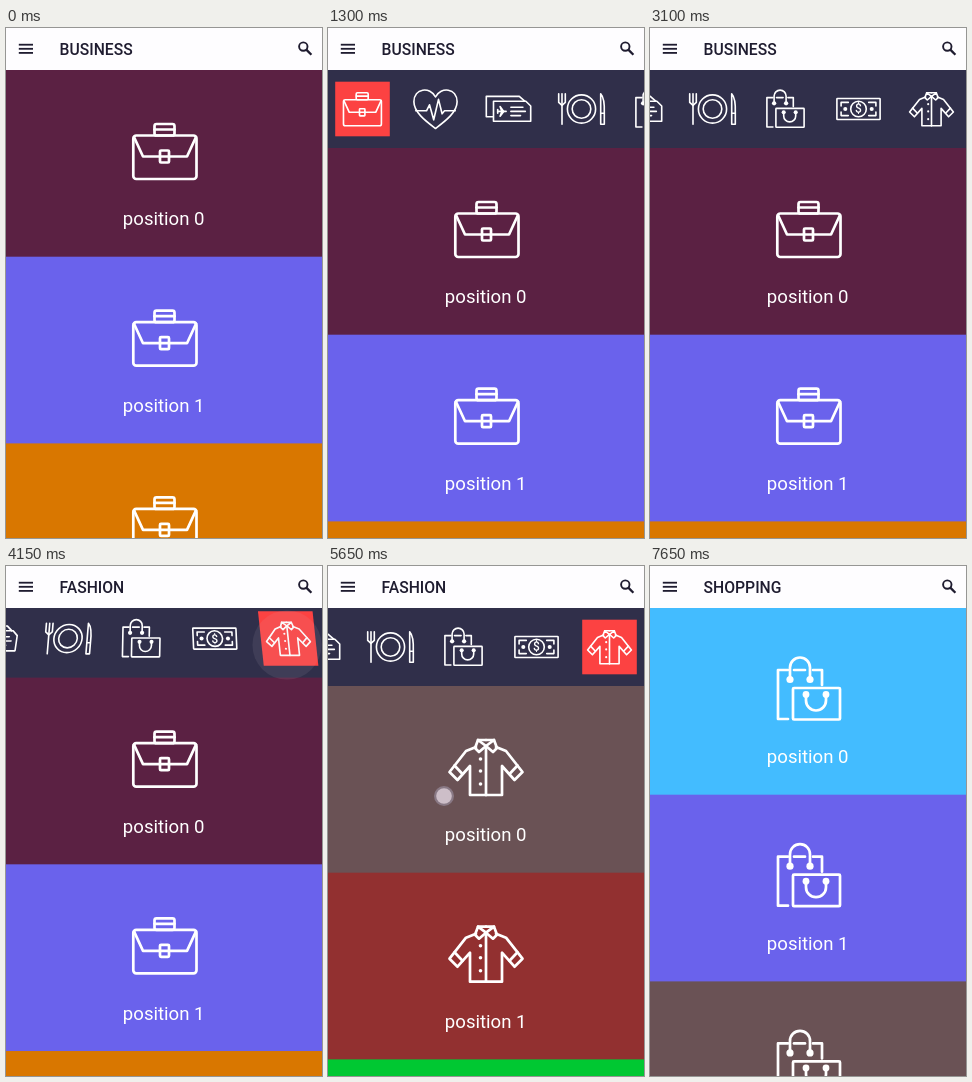
These frames come from a looping animation (316 px wide and 510 px high, 7700 ms). An HTML page with a canvas:

```html
<!DOCTYPE html>
<html lang="en">
<head>
<meta charset="utf-8">
<title>Pull-down menu</title>
<style>
html, body { margin: 0; width: 100%; height: 100%; overflow: hidden; background: #fefdff; }
canvas { display: block; width: 316px; height: 510px; }
</style>
</head>
<body>
<canvas id="stage"></canvas>
<script>
const W = 316, H = 510, LOOP = 7700;
const BAR = 42, MENU = 78, CARD = 186.7;
const FONT = 'Roboto, Arial, sans-serif';
const canvas = document.getElementById('stage');
const ctx = canvas.getContext('2d');
const dpr = window.devicePixelRatio || 1;
canvas.width = W * dpr;
canvas.height = H * dpr;

const clamp = v => Math.max(0, Math.min(1, v));
const span = (t, start, length) => clamp((t - start) / length);
const ease = v => (1 - Math.cos(Math.PI * v)) / 2;
const glide = (t, start, length) => ease(span(t, start, length));

// ---- drawing helpers ----
function trace(pts) {
  ctx.beginPath();
  for (let i = 0; i < pts.length; i += 2) ctx.lineTo(pts[i], pts[i + 1]);
}
function line(...pts) {
  trace(pts);
  ctx.stroke();
}
function shape(...pts) {
  trace(pts);
  ctx.closePath();
  ctx.stroke();
}
function box(x, y, w, h, r) {
  ctx.beginPath();
  ctx.roundRect(x, y, w, h, r);
  ctx.stroke();
}
function ring(x, y, r) {
  ctx.beginPath();
  ctx.arc(x, y, r, 0, Math.PI * 2);
  ctx.stroke();
}
function dot(x, y, r) {
  ctx.beginPath();
  ctx.arc(x, y, r, 0, Math.PI * 2);
  ctx.fill();
}
function mirrored(draw) {
  for (const side of [1, -1]) {
    ctx.save();
    ctx.scale(side, 1);
    draw();
    ctx.restore();
  }
}

// ---- icons, centred on 0,0 at card size ----
function briefcase() {
  box(-31.7, -15.5, 63.2, 43.5, 3);
  box(-10.5, -27, 20, 11.5, 2);
  line(-10.5, -21.5, 9.5, -21.5);
  line(-31, -14, -22, 5.5, -5, 5.5);
  line(31, -14, 22, 5.5, 4, 5.5);
  box(-5, -0.5, 9, 12, 1);
  line(-5, 5.5, 4, 5.5);
}
function heart() {
  ctx.beginPath();
  ctx.moveTo(0, 32.5);
  ctx.bezierCurveTo(-15, 21, -36, 6, -36, -12);
  ctx.bezierCurveTo(-36, -35, -9, -38, 0, -20);
  ctx.bezierCurveTo(9, -38, 36, -35, 36, -12);
  ctx.bezierCurveTo(36, 6, 15, 21, 0, 32.5);
  ctx.stroke();
  line(-33, 3, -15, 3, -10, -7, -3, 18, 5, -16, 11, 8, 15, 3, 33, 3);
}
function ticket() {
  line(-26, 13, -37, 13, -37, -21, 18, -21, 27, -13);
  shape(-25, -13, 29, -13, 37, -5, 37, 20.5, -25, 20.5);
  line(-18, 4, -4, 4);
  line(-18, 1, -18, 7);
  shape(-14, -4, -8, 4, -14, 12, -11, 4);
  line(4, -3, 24, -3);
  line(4, 4, 28, 4);
  line(4, 11, 20, 11);
}
function plate() {
  ring(0, 0, 23.5);
  ring(0, 0, 15.5);
  line(-38, -25.5, -38, -11, -32.5, -6, -27, -11, -27, -25.5);
  line(-32.5, -25.5, -32.5, 25.5);
  ctx.beginPath();
  ctx.moveTo(32, 25.5);
  ctx.lineTo(32, -25.5);
  ctx.quadraticCurveTo(39, -18, 38, 7);
  ctx.lineTo(32, 7);
  ctx.moveTo(38, 7);
  ctx.lineTo(38, 25.5);
  ctx.lineTo(32, 25.5);
  ctx.stroke();
}
function bags() {
  line(-21, -19, -31, -19, -31, 30, -21, 30);
  line(4, -19, 13, -19, 13, -4);
  line(-15, -19, -4, -19);
  ctx.beginPath();
  ctx.moveTo(-19, -10);
  ctx.arc(-9, -21.5, 10, Math.PI, 0);
  ctx.lineTo(1, -10);
  ctx.stroke();
  dot(-19, -9.5, 3.6);
  dot(1, -9.5, 3.6);
  box(-16, -1, 47, 31.5, 1);
  ctx.beginPath();
  ctx.moveTo(-3, 6);
  ctx.arc(7, 11.5, 10, Math.PI, 0, true);
  ctx.lineTo(17, 6);
  ctx.stroke();
  dot(-3, 5.5, 3.4);
  dot(17, 5.5, 3.4);
}
function money() {
  box(-36, -17.5, 72, 35, 1);
  ring(0, 0, 13);
  ctx.font = '500 20px ' + FONT;
  ctx.textAlign = 'center';
  ctx.fillText('$', 0, 7.2);
  mirrored(() => {
    dot(22, 0, 3.4);
    line(17, -11, 29, -11, 29, -5);
    line(17, 11, 29, 11, 29, 5);
  });
}
function jacket() {
  mirrored(() => {
    line(10, -20, 20, -16, 36.5, 5, 28.5, 13, 16, -1, 16, 28, 0, 28);
    line(31.5, -1.5, 23.5, 7);
    shape(8, -27, 0, -21, 7, -15, 11, -19);
    line(8, -27, 0, -27);
  });
  line(0, -21, 0, 28);
  for (const y of [-8, 4, 17]) dot(-5.5, y, 1.8);
}

const ITEMS = [briefcase, heart, ticket, plate, bags, money, jacket];
const PAGES = [
  { title: 'BUSINESS', item: 0, colors: ['#5b2143', '#6a62ec', '#d97700'] },
  { title: 'FASHION', item: 6, colors: ['#6a5255', '#923030', '#00c832'] },
  { title: 'SHOPPING', item: 4, colors: ['#43bcff', '#6a62ec', '#6a5255'] }
];

function icon(draw, scale) {
  ctx.save();
  ctx.scale(scale, scale);
  ctx.strokeStyle = ctx.fillStyle = '#fff';
  ctx.lineWidth = 2.7;
  ctx.lineCap = ctx.lineJoin = 'round';
  draw();
  ctx.restore();
}

// ---- timeline ----
const TAPS = [4000, 6702];
const CLOSE_DELAY = 66, CLOSE_TIME = 400;
const REVEAL_DELAY = 118, REVEAL_TIME = 800, REVEAL_R = 577;

const pull = (t, start) => glide(t, start, 430);
const shut = (t, tap) => glide(t, tap + CLOSE_DELAY, CLOSE_TIME);
const openness = t => pull(t, 480) - shut(t, TAPS[0]) + pull(t, 5120) - shut(t, TAPS[1]);
const drag = t => 165 * glide(t, 2055, 410);
const scrollAt = t => drag(t) + 26 * (1 - (1 - span(t, 2440, 330)) ** 2);
const itemX = (i, scroll) => 34.5 + 73 * i - scroll;

const TOUCHES = [
  { down: 440, up: 1000, at: t => [137 - 4 * pull(t, 480), 181.5 + 78 * pull(t, 480)] },
  { down: 2000, up: 2480, at: t => [225 - drag(t), 84] },
  { down: 3880, up: TAPS[0], at: () => [281, 79] },
  { down: 5080, up: 5720, at: t => [119 - 3 * pull(t, 5120), 152 + 78 * pull(t, 5120)] },
  { down: 6590, up: TAPS[1], at: () => [136, 80] }
];

// ---- parts ----
function menu(open, scroll, selected) {
  ctx.fillStyle = '#302f4a';
  ctx.fillRect(0, BAR, W, MENU);
  const fold = 1 - open;
  const y = 81 - MENU * fold - 5 * fold * fold;
  ITEMS.forEach((draw, i) => {
    const off = (itemX(i, scroll) - W / 2) * (1 + 0.05 * fold);
    ctx.save();
    ctx.transform(1, 0, 0.008 * fold * off, 1, W / 2 + off, y);
    if (i === selected) {
      ctx.fillStyle = '#fc4242';
      ctx.fillRect(-27.3, -27.3, 54.6, 54.6);
    }
    icon(draw, 0.6);
    ctx.restore();
  });
}

function list(page, top) {
  page.colors.forEach((color, i) => {
    const y = top + i * CARD;
    ctx.fillStyle = color;
    ctx.fillRect(0, y, W, H);
    ctx.save();
    ctx.translate(page.item === 6 ? 158 : 159, y + 81);
    icon(ITEMS[page.item], 1);
    ctx.restore();
    ctx.fillStyle = '#fff';
    ctx.font = '400 18.6px ' + FONT;
    ctx.textAlign = 'center';
    ctx.fillText('position ' + i, 157.7, y + 155.3);
  });
}

function toolbar(title) {
  ctx.fillStyle = '#fefdff';
  ctx.fillRect(0, 0, W, BAR);
  ctx.fillStyle = ctx.strokeStyle = '#1f1c30';
  for (const y of [15.8, 19.9, 24]) ctx.fillRect(12.8, y, 14.2, 1.8);
  ctx.lineWidth = 1.9;
  ctx.lineCap = 'butt';
  ring(297.3, 18.6, 4.2);
  ctx.lineWidth = 2.3;
  line(300.3, 21.6, 305.4, 26.7);
  ctx.font = '500 15.7px ' + FONT;
  ctx.textAlign = 'left';
  ctx.fillText(title, 53.6, 26.9);
}

function pointer(touch, t) {
  if (t < touch.down || t > touch.up + 250) return;
  const [x, y] = touch.at(Math.min(t, touch.up));
  if (t < touch.up) {
    ctx.globalAlpha = span(t, touch.down, 60);
    ctx.fillStyle = 'rgba(185,180,205,0.4)';
    dot(x, y, 10);
    ctx.fillStyle = 'rgba(222,208,216,0.8)';
    dot(x, y, 7.8);
  } else {
    const k = span(t, touch.up, 250);
    ctx.globalAlpha = 1 - k;
    ctx.fillStyle = 'rgba(200,195,205,0.25)';
    dot(x, y, 8 + 44 * k);
  }
  ctx.globalAlpha = 1;
}

function render(t) {
  const open = clamp(openness(t));
  const scroll = scrollAt(t);
  const current = TAPS.filter(tap => t >= tap).length;
  const page = PAGES[current];
  const top = BAR + MENU * open;

  ctx.setTransform(dpr, 0, 0, dpr, 0, 0);
  menu(open, scroll, page.item);

  if (current === 0) {
    list(page, top);
  } else {
    const r = REVEAL_R * glide(t, TAPS[current - 1] + REVEAL_DELAY, REVEAL_TIME);
    list(PAGES[current - 1], top);
    ctx.save();
    ctx.beginPath();
    ctx.rect(0, top, W, H);
    ctx.clip();
    ctx.beginPath();
    ctx.arc(itemX(page.item, scroll), top - MENU / 2, r, 0, Math.PI * 2);
    ctx.clip();
    list(page, top);
    ctx.restore();
  }

  toolbar(page.title);
  TOUCHES.forEach(touch => pointer(touch, t));
}

const begin = performance.now();
function tick() {
  render((performance.now() - begin) % LOOP);
  requestAnimationFrame(tick);
}
tick();
</script>
</body>
</html>
```
